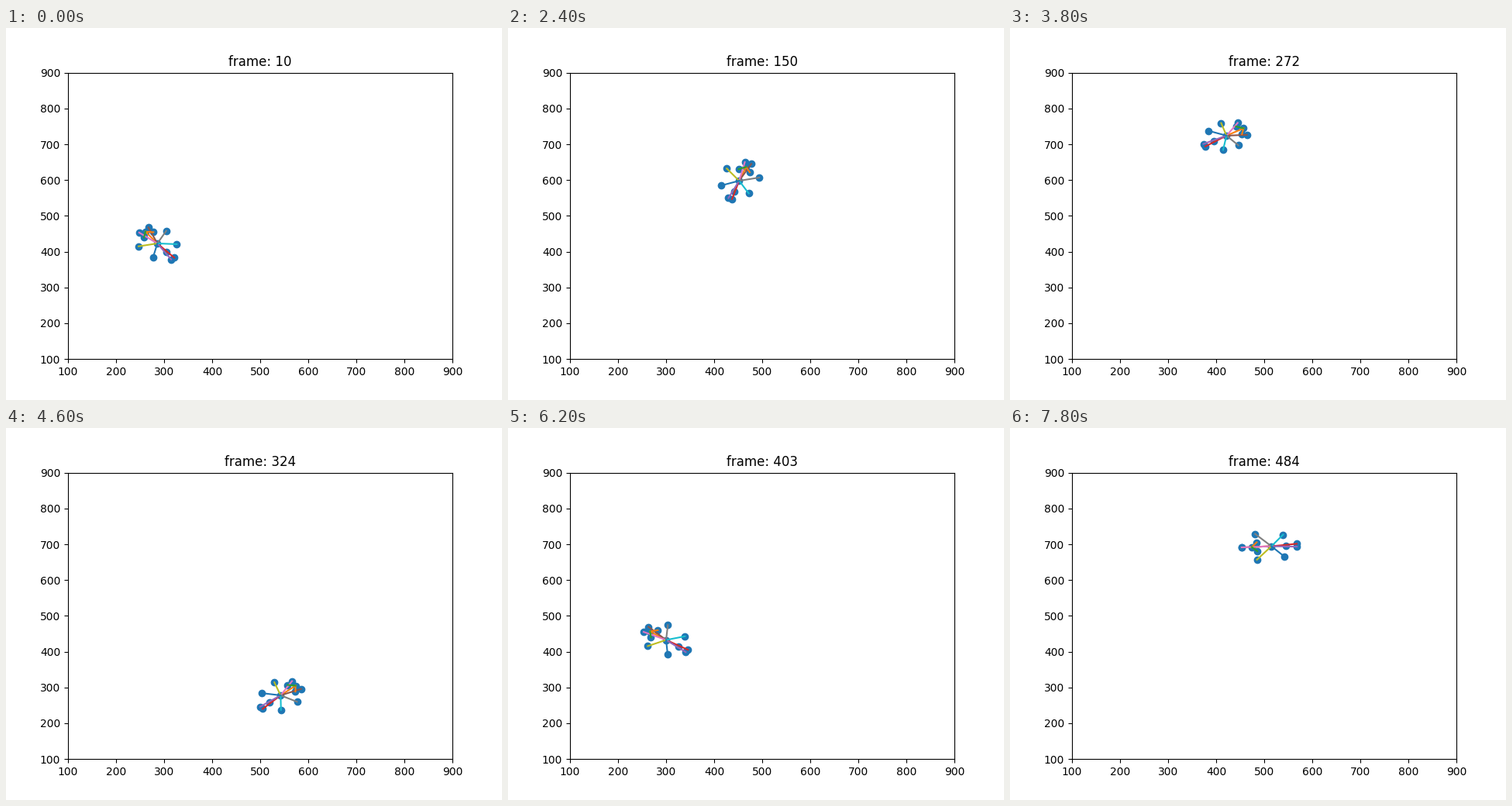
A matplotlib script for the animation above (8000 ms loop, 640 px wide and 480 px high).

```python
import numpy as np
import matplotlib.pyplot as plt
from matplotlib.animation import FuncAnimation

N = 40
STEP = 200

# Walk of the thorax: step, x, y
PATH = np.array([
    (0, 286, 423), (3, 511, 152), (5, 774, 290), (6, 721.5, 395),
    (10, 218, 560), (12, 452, 598), (15, 527, 667), (18, 429, 718),
    (19, 421.5, 724), (22, 590, 397), (24, 495, 159), (27, 483, 364.5),
    (30, 150, 550), (33, 600, 198), (34, 738, 289), (36, 724, 237),
    (39, 515, 694.5)]).T

# Step, counter, heading in degrees, how far the legs reach forward
POSE = np.array([
    (0, 10, 127, 0), (6, 86, 243.5, -15), (12, 150, 69.5, 6),
    (19, 272, 30, -9), (27, 377, 52, 3), (34, 422, 214, 5),
    (39, 484, 183, 15)]).T


def at(i, table):
    """Values of the table's rows at step i."""
    return [np.interp(i, table[0], row) for row in table[1:]]


def joints(reach):
    """Joints seen from the thorax: real part forward, imaginary part left."""
    wing = -53 + 4j
    fore = 47 + reach + 1j * max(12 - 0.8 * reach, 0)
    mid = 17 + reach + 36j
    hind = -26 + 31j
    eye = 30 + 12.4j
    body = [41, -31]                      # head, abdomen
    for left in (wing, fore, mid, hind, eye):
        body += [left.conjugate(), left]
    return np.array(body)


fig, ax = plt.subplots(figsize=(6.4, 4.8), dpi=100)
ax.set_xlim(100, 900)
ax.set_ylim(100, 900)
title = ax.set_title("")
dots = ax.scatter([], [], color="C0")
lines = [ax.plot([], [], color=f"C{k % 10}")[0] for k in range(1, 13)]


def draw(i):
    thorax = complex(*at(i, PATH))
    count, heading, reach = at(i, POSE)
    ends = thorax + joints(reach) * np.exp(1j * np.radians(heading))
    pts = np.append(ends, thorax)
    dots.set_offsets(np.column_stack([pts.real, pts.imag]))
    for k, (line, end) in enumerate(zip(lines, ends)):
        start = thorax if k < 10 else ends[0]     # eyes hang on the head
        line.set_data([start.real, end.real], [start.imag, end.imag])
    title.set_text(f"frame: {round(count)}")
    return [dots, title, *lines]


anim = FuncAnimation(fig, draw, frames=N, interval=STEP, repeat=True,
                     repeat_delay=0, blit=False)
plt.show()
```
